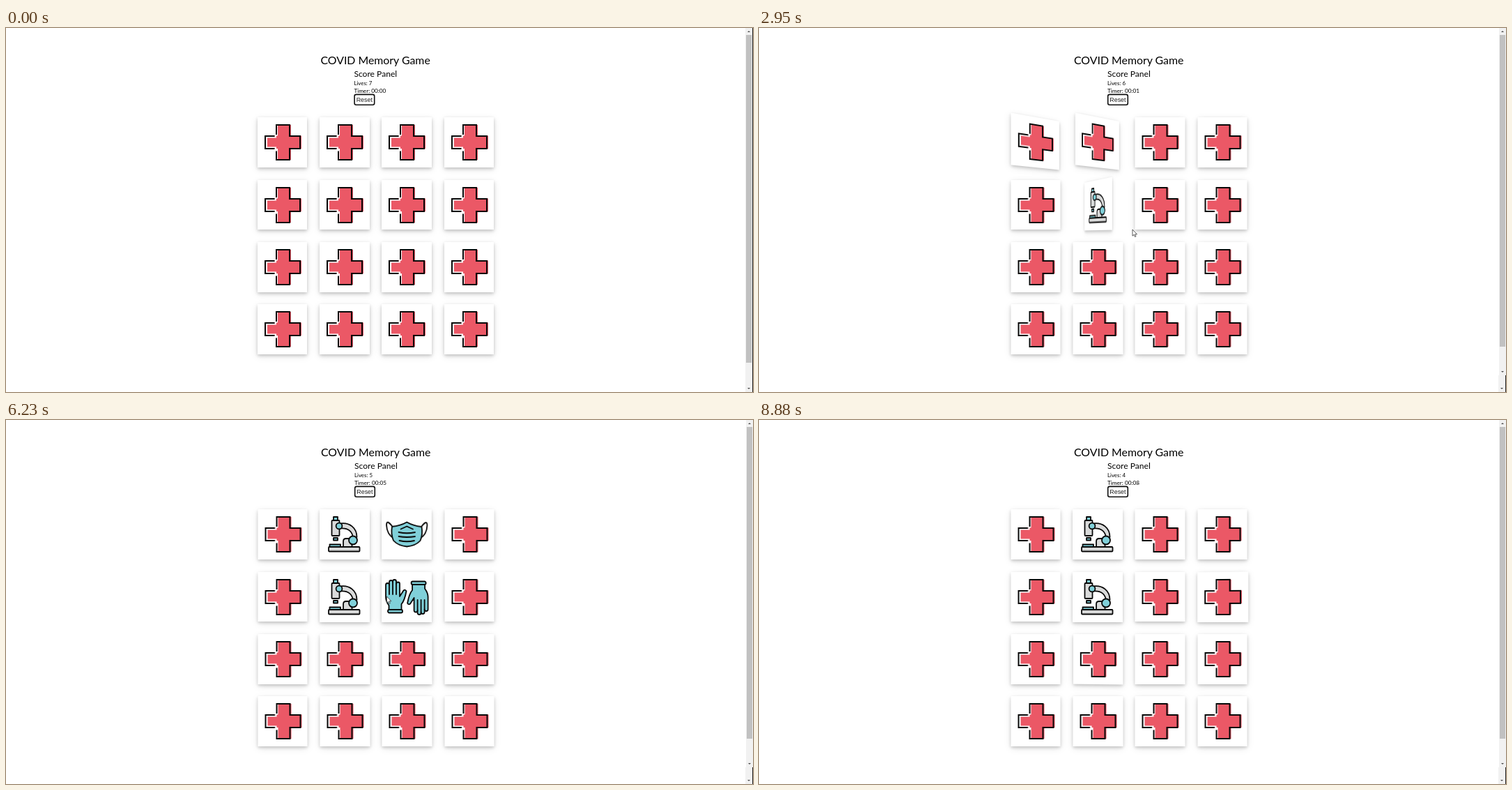
These frames come from a looping animation (1072x522 px, 8.96 s). An HTML page:

```html
<!DOCTYPE html>
<html lang="en">
<head>
<meta charset="utf-8">
<title>COVID Memory Game</title>
<style>
  html, body { margin: 0; width: 100%; height: 100%; overflow: hidden; background: #fff; }
  #stage { position: absolute; left: 0; top: 0; width: 1072px; height: 522px; overflow: hidden; }
  #stage > svg { position: absolute; left: 0; top: 0; }
  #grid { position: absolute; left: 351.9px; top: 119.5px; width: 357.3px; height: 357.3px; perspective: 558px; }
  .card {
    position: absolute; width: 71.5px; height: 71.5px; background: #fff;
    box-shadow: 0 2.2px 4.5px rgba(0,0,0,.2), 0 3.3px 11px rgba(0,0,0,.1);
  }
  .card svg { display: block; width: 100%; height: 100%; }
  .text { font-family: Carlito, Lato, sans-serif; fill: #000; }
  .ink { fill: none; stroke: #080808; stroke-width: 1.8; stroke-linejoin: round; stroke-linecap: round; }
  .teal { fill: #80d0d9; }
  .gray { fill: #d9dada; }
  .paper { fill: #fff; }
</style>
</head>
<body>
<div id="stage">
  <svg width="1072" height="522" viewBox="0 0 1072 522">
    <defs>
      <symbol id="cross" viewBox="0 0 71.5 71.5">
        <path fill="#eb5866" d="M29 11H48V26.600H63V45H48V61H29V45H14V26.600H29Z"/>
        <path fill="none" stroke="#fff" stroke-width="2" d="M26 24.500V28.500H14M26 47V43.500H14"/>
        <path class="ink" style="stroke-width:2;stroke-linejoin:miter;stroke-linecap:butt"
          d="M27 25V11H46V27H61V45H46V61H27V48.500M24.500 27H11V45H24.500"/>
      </symbol>
      <symbol id="microscope" viewBox="0 0 71.5 71.5">
        <g class="ink">
          <path class="gray" d="M29 20.500C43 18.500 53 27 53 40L47.500 42C47 32 41 26.500 29 27.500Z"/>
          <path class="gray" d="M33.500 54V46Q33.500 42 37.500 42H46V54Z"/>
          <rect class="teal" x="19.500" y="11" width="6" height="5"/>
          <rect class="gray" x="17" y="16" width="11" height="22" rx="1"/>
          <rect class="teal" x="19.500" y="41" width="6" height="3.500"/>
          <circle class="teal" cx="27.500" cy="24" r="4.400"/>
          <circle class="teal" cx="47.500" cy="44.500" r="6"/>
          <rect class="teal" x="14" y="50.500" width="15.500" height="3.500"/>
          <rect class="gray" x="12.500" y="54" width="44.500" height="6.500" rx="1"/>
        </g>
      </symbol>
      <g id="glove" class="ink">
        <path class="teal" d="M10 54V48Q5.500 42 5.500 36V18.500a2.500 2.500 0 0 1 5 0V14.500a2.500 2.500 0 0 1 5 0
          V13.500a2.500 2.500 0 0 1 5 0V17a2.500 2.500 0 0 1 5 0V35L31 26.500Q33.500 24.500 35 27.500Q32.500 41 28 46V54Z"/>
        <path d="M10.500 18V32M15.500 14V32M20.500 17V32"/>
        <rect class="teal" x="8.500" y="54" width="21" height="4.500" rx="2"/>
      </g>
      <symbol id="gloves" viewBox="0 0 71.5 71.5">
        <use href="#glove"/>
        <use href="#glove" transform="rotate(180 35.8 36)"/>
      </symbol>
      <symbol id="mask" viewBox="0 0 71.5 71.5">
        <g class="ink">
          <path class="paper" d="M15 25Q6.500 14 6.500 23Q7 36 17 42M56.500 25Q65 14 65 23Q64.500 36 54.500 42"/>
          <path class="teal" d="M14.500 25Q27 23.500 35.750 18.500Q44.500 23.500 57 25Q59 36 55 45Q48 52.500 35.750 53.500Q23.500 52.500 16.500 45Q12.500 36 14.500 25Z"/>
          <path d="M27 28.500L35.750 24.500L44.500 28.500M24 33Q35.750 35.500 47.500 33M24 39Q35.750 41 47.500 39M25 45Q35.750 47.500 46.500 45"/>
        </g>
      </symbol>
    </defs>
    <g id="head" class="text">
      <text id="title" x="451.4" y="52.2">COVID Memory Game</text>
      <text id="panel" x="499.4" y="70.1">Score Panel</text>
      <text id="lives" x="499.4" y="82"></text>
      <text id="timer" x="499.4" y="92.5"></text>
      <rect x="500.1" y="95.4" width="28.6" height="14.8" rx="2.4" fill="#fff" stroke="#101010" stroke-width="1.6"/>
      <text x="502.7" y="106" font-size="8.9" style="font-family:'Liberation Sans',Arial,sans-serif;fill:#222">Reset</text>
    </g>
    <g id="bar"></g>
  </svg>
  <div id="grid"></div>
  <svg width="1072" height="522" viewBox="0 0 1072 522">
    <path id="cursor" d="M0 0V9.200L2.100 7.300L3.500 10.500L5 9.800L3.600 6.800H6.500Z" fill="#fff" stroke="#333" stroke-width=".8"/>
  </svg>
</div>
<script>
const LOOP = 8960, FLIP = 560, HIDE_AFTER = 1000, PITCH = 89.33, GRID_X = 352, GRID_Y = 119.5;
const $ = id => document.getElementById(id);

// Where the pointer goes; a stop with an icon is a click on the card below it
const stops = [
  { t: 430, x: 944, y: 198 },
  { t: 1346, x: 480, y: 176, icon: 'microscope' },
  { t: 1813, x: 369, y: 177, icon: 'gloves' },
  { t: 2250, x: 537, y: 271 },
  { t: 2838, x: 506, y: 268, icon: 'microscope' },
  { t: 2950, x: 536, y: 289 },
  { t: 4195, x: 496, y: 178, icon: 'microscope' },
  { t: 4340, x: 577, y: 258 },
  { t: 5235, x: 586, y: 236, icon: 'gloves' },
  { t: 5430, x: 583, y: 172 },
  { t: 5716, x: 583, y: 172, icon: 'mask' },
  { t: 6763, x: 508, y: 338, icon: 'mask' },
  { t: 6910, x: 612, y: 317 },
  { t: 7395, x: 662, y: 258, icon: 'gloves' },
  { t: 7860, x: 972, y: 300 }
];

const cards = [];
for (let i = 0; i < 16; i++) {
  const el = document.createElement('div');
  el.className = 'card';
  el.style.left = 8.93 + i % 4 * PITCH + 'px';
  el.style.top = 8.93 + Math.floor(i / 4) * PITCH + 'px';
  el.innerHTML = '<svg viewBox="0 0 71.5 71.5"><use href="#cross"/></svg>';
  $('grid').append(el);
  cards.push({ el, svg: el.firstChild, use: el.querySelector('use'), turns: [], icon: '' });
}

// Play the game: every two clicks make a pair, a wrong pair turns back and costs a life
const misses = [];
const clicks = stops.filter(s => s.icon);
for (const click of clicks) {
  const col = Math.floor((click.x - GRID_X) / PITCH), row = Math.floor((click.y - GRID_Y) / PITCH);
  click.card = cards[row * 4 + col];
  click.card.icon = click.icon;
  click.card.turns.push({ t: click.t, from: 0, to: 180 });
}
for (let i = 0; i < clicks.length; i += 2) {
  const [a, b] = clicks.slice(i, i + 2);
  if (a.icon === b.icon) continue;
  misses.push(b.t);
  for (const { card } of [a, b]) card.turns.push({ t: b.t + HIDE_AFTER, from: 180, to: 0 });
}
cards.forEach(c => c.turns.sort((a, b) => a.t - b.t));

function backOut(u) {
  const v = Math.min(u, 1) - 1;
  return 1 + 2.70158 * v ** 3 + 1.70158 * v * v;
}

function drawCard(card, t) {
  const turn = card.turns.filter(k => k.t <= t).pop();
  const angle = turn ? turn.from + (turn.to - turn.from) * backOut((t - turn.t) / FLIP) : 0;
  const open = Math.cos(angle * Math.PI / 180) < 0;
  card.el.style.transform = angle ? `rotateY(${angle}deg)` : 'none';
  card.svg.style.transform = open ? 'scaleX(-1)' : 'none';
  card.use.setAttribute('href', '#' + (open ? card.icon : 'cross'));
}

function drawCursor(t) {
  const i = stops.findIndex(s => s.t > t);
  $('cursor').style.display = i > 0 ? '' : 'none';
  if (i < 1) return;
  const a = stops[i - 1], b = stops[i];
  const u = (t - a.t) / (b.t - a.t), e = u * u * (3 - 2 * u);
  $('cursor').setAttribute('transform', `translate(${a.x + (b.x - a.x) * e} ${a.y + (b.y - a.y) * e})`);
}

const rect = (x, y, w, h, fill) => `<rect x="${x}" y="${y}" width="${w}" height="${h}" fill="${fill}"/>`;
const arrow = (x, y, dir) => `<path d="M${x - 2} ${y - dir}h4l-2 ${2 * dir}z" fill="#505050"/>`;

function scrollbar(x, end, thumbEnd) {
  return rect(x, 0, 10, end, '#f1f1f1') + rect(x + 1, 10, 8, thumbEnd - 10, '#c1c1c1') +
    arrow(x + 5, 5, -1) + arrow(x + 5, end - 5, 1);
}
const fullBar = scrollbar(1061, 522, 480) + rect(1071, 0, 1, 522, '#222');
const shortBar = fullBar + rect(1061, 0, 11, 498, '#fff') + scrollbar(1062, 498, 457);

let moved = null;
function layout(t) {
  const now = t >= 100;
  if (now === moved) return;
  moved = now;
  $('bar').innerHTML = now ? shortBar : fullBar;
  $('head').setAttribute('transform', now ? 'translate(.6 0)' : '');
  $('grid').style.transform = now ? 'translateX(.5px)' : 'none';
}

// Pick the font size at which the text has its natural width
function fit(id, width) {
  const el = $(id);
  el.setAttribute('font-size', 100);
  el.setAttribute('font-size', 100 * width / el.getComputedTextLength());
}

function draw(t) {
  layout(t);
  $('lives').textContent = 'Lives: ' + (7 - misses.filter(m => m <= t).length);
  $('timer').textContent = 'Timer: 00:0' + Math.max(0, Math.floor((t - 1035) / 960));
  cards.forEach(c => drawCard(c, t));
  drawCursor(t);
}

draw(0);
fit('title', 157.5);
fit('panel', 61.8);
fit('lives', 26);
fit('timer', 46);

const begin = performance.now();
function tick() {
  draw((performance.now() - begin) % LOOP);
  requestAnimationFrame(tick);
}
tick();
</script>
</body>
</html>
```
